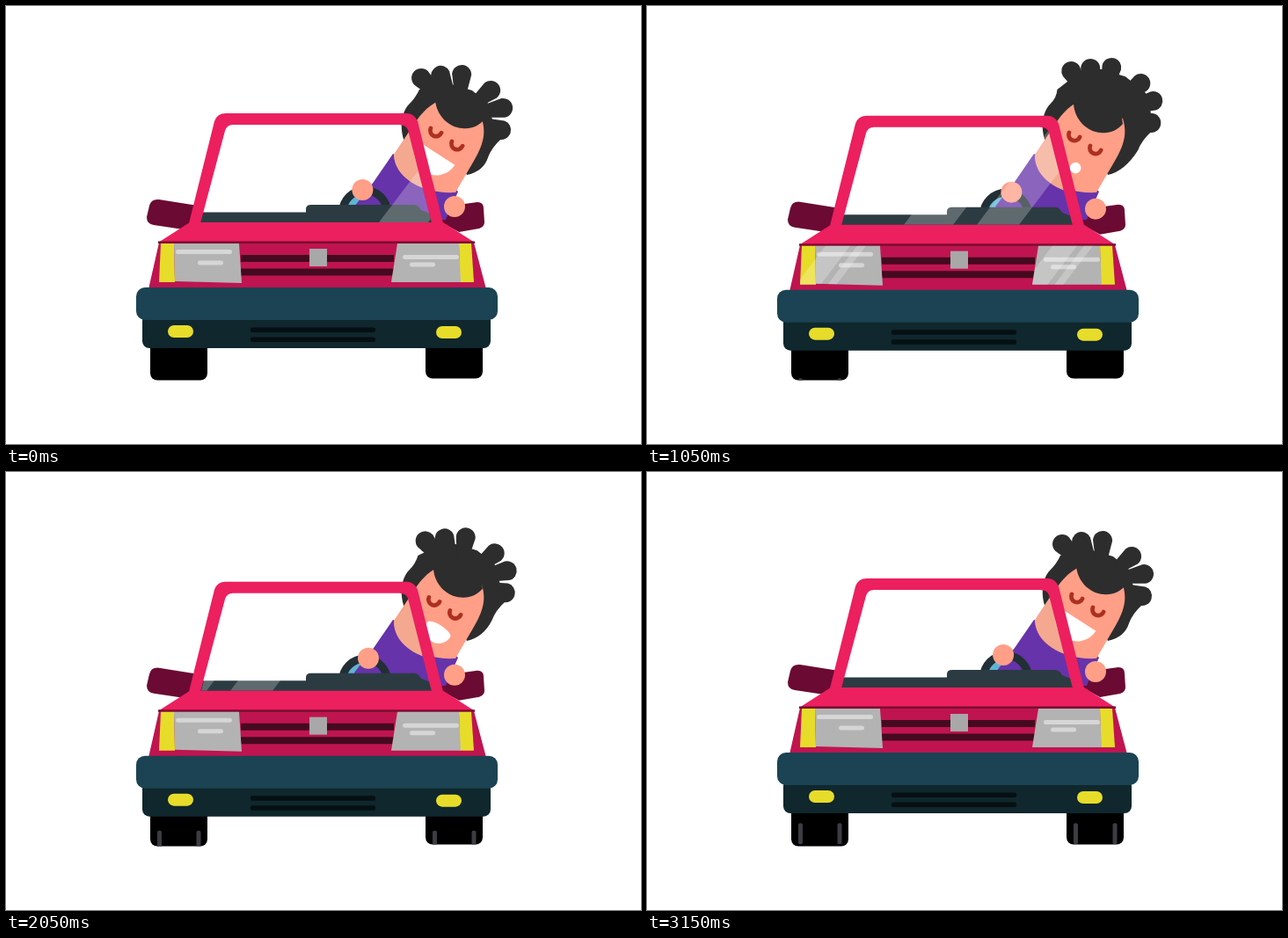
Recreate the animation shown at these times as an HTML page with a canvas. Size 722 px wide and 498 px high, loop 3250 ms.

```html
<!DOCTYPE html>
<html lang="en">
<head>
<meta charset="utf-8">
<title>Car ride</title>
<style>
  html, body { margin: 0; width: 722px; height: 498px; overflow: hidden; background: #fff; }
  canvas { display: block; }
</style>
</head>
<body>
<canvas id="stage" width="722" height="498"></canvas>
<script>
const ctx = document.getElementById('stage').getContext('2d');
const LOOP = 3250, STEP = 100, COUNT = 33;
const PINK = '#ec1f5f', SKIN = '#ff9f87', HAIR = '#2d2d2d', YELLOW = '#e8dc2a';
const WINE = '#6b0a33', LAMP = '#b3b3b3', GRILLE = '#450a1f', VENT = '#060f12';

const GLASS = 'M222 246 L249 142 Q251 135 258 135 H447 Q455 135 457 141 L484 246Z';
const HEAD = 'M441 169 C442 195 473 214 511 212 L532 176 C545 154 545 142 541 128 L505 104 C488 107 476 117 467 130Z';

// Car height offsets as [step, pixels].
const BOUNCE = [[0, 0], [4, 3], [8, 5], [15, -1], [19, 3], [24, 2], [32, -1]];

const mix = (a, b, f) => a + (b - a) * f;
const ramp = (k, a, b) => Math.min(1, Math.max(0, (k - a) / (b - a)));
const swell = (k, peak) => (1 + Math.cos((k - peak) / COUNT * Math.PI * 2)) / 2;

function bounceAt(k) {
  let i = 0;
  while (i < BOUNCE.length - 2 && k > BOUNCE[i + 1][0]) i++;
  const [[k0, y0], [k1, y1]] = BOUNCE.slice(i, i + 2);
  const f = ramp(k, k0, k1);
  return mix(y0, y1, f * f * (3 - 2 * f));
}

function shape(color, path) {
  ctx.fillStyle = color;
  ctx.fill(new Path2D(path));
}

function box(color, x, y, w, h, r = 0) {
  ctx.fillStyle = color;
  ctx.beginPath();
  ctx.roundRect(x, y, w, h, r);
  ctx.fill();
}

function disc(color, x, y, r) {
  ctx.fillStyle = color;
  ctx.beginPath();
  ctx.arc(x, y, r, 0, Math.PI * 2);
  ctx.fill();
}

function clipped(path, draw) {
  ctx.save();
  ctx.clip(new Path2D(path));
  draw();
  ctx.restore();
}

function shifted(x, y, draw) {
  ctx.save();
  ctx.translate(x, y);
  draw();
  ctx.restore();
}

// Slanted light band, x is its left edge at the bottom y.
function band(x, y, w, h) {
  const dx = h * 0.76;
  shape('rgba(255,255,255,0.24)', `M${x} ${y} h${w} l${dx} ${-h} h${-w}Z`);
}

// All tufts drift together; the gaps between them close as they swing out.
function hairBack(sway) {
  const cx = 515, cy = 125;
  const tips = [[472, 82], [494, 79], [518, 78], [551, 96], [565, 116], [563, 141]]
    .map(([x, y]) => [x + 11.5 * sway, y - 9 * sway]);
  const pull = 0.24 * (1 - sway);
  const crown = tips.slice(1).map(([x, y], i) => [
    mix((x + tips[i][0]) / 2, cx, pull),
    mix((y + tips[i][1]) / 2, cy, pull)
  ]);
  const [ex, ey] = tips[5];
  shape(HAIR, `M453 154 C447 138 450 120 458 112 Q466 104 ${470 - 4 * sway} 95`
    + crown.map(p => `L${p}`).join('')
    + `L${ex} ${ey + 10} Q${ex - 11} ${ey + 20} ${ex - 15} ${ey + 31} Q543 188 524 192 L500 150Z`);
  for (const [x, y] of tips) {
    const rx = mix(x, cx, 0.55), ry = mix(y, cy, 0.55);
    const a = Math.atan2(y - ry, x - rx);
    const sx = -Math.sin(a) * 6, sy = Math.cos(a) * 6;
    ctx.beginPath();
    ctx.arc(x, y, 11, a - Math.PI / 2, a + Math.PI / 2);
    ctx.lineTo(rx + sx, ry + sy);
    ctx.lineTo(rx - sx, ry - sy);
    ctx.fill();
  }
}

// A half-disc smile that closes to a small round whistle and opens again.
function mouth(k) {
  const round = Math.min(ramp(k, 4, 8), ramp(k, 24, 19));
  const drift = ramp(k, 8, 15);
  const r = 6.3 + 2.7 * ramp(k, 15, 19);
  const x = mix(489, 482 + 12 * drift, round);
  const y = mix(167, 181.5 + 6 * drift, round);
  const size = mix(25.5, r, round);
  shifted(x, y, () => {
    ctx.rotate(0.575);
    ctx.fillStyle = '#fff';
    ctx.beginPath();
    ctx.ellipse(0, 0, size, size, 0, 0, Math.PI);
    ctx.ellipse(0, 0, size, r * round, 0, Math.PI, Math.PI * 2);
    ctx.fill();
  });
}

function driver(k) {
  const sway = swell(k, 13.7) ** 1.7;
  const nod = Math.min(1, sway * 1.7);
  hairBack(sway);
  shape('#6633aa', 'M440 168 L418 200 L396 228 L405 243 H500 L514 211 L490 190Z');
  shape(SKIN, HEAD);
  shifted(-3 * nod, 5 * nod, () => {
    shape(HAIR, 'M488 106 C489 124 503 138 519 139 C529 140 537 137 544 129 L541 108 L500 95Z');
    ctx.strokeStyle = '#ad3020';
    ctx.lineWidth = 4.8;
    ctx.lineCap = 'round';
    for (const [x, y] of [[489, 141.5], [513, 156.5]]) {
      ctx.beginPath();
      ctx.arc(x, y, 6.6, 0.4, Math.PI + 0.4);
      ctx.stroke();
    }
  });
  mouth(k);
}

function wheels(k) {
  const low = 372 + 6.85 * k % 84;
  for (const [x, bottom] of [[164, 425.5], [477, 423.5]]) {
    box('#000', x, 375, 65, bottom - 375, 8);
    clipped(`M${x} 375 h65 V${bottom} h-65Z`, () => {
      for (const dx of [8, 52.5]) box('#3c3c42', x + dx, low - 24, 5, 24, 2);
    });
  }
}

function interior(k) {
  const glint = 424 - 12 * k;
  clipped(GLASS, () => shape('#f4a890', HEAD));
  ctx.lineWidth = 9;
  ctx.strokeStyle = '#222f35';
  ctx.beginPath();
  ctx.arc(408, 235, 25.5, Math.PI, Math.PI * 2);
  ctx.stroke();
  shape('#2c3b42', 'M220 234.5 H341 V231 Q341 226 347 226 H464 Q469 226 472 232 L482 236 L486 248 H220Z');
  disc(SKIN, 405 + 10.5 * swell(k, 14.5), 209, 12);
  clipped(GLASS, () => {
    band(glint, 246, 56, 115);
    band(glint + 83, 246, 48, 115);
  });
}

function headlight(x, lamp, yellow, k) {
  shape(YELLOW, yellow);
  shape(LAMP, lamp);
  box('#d6d6d6', x + 2, x < 300 ? 277 : 283, 64, 5, 2.5);
  box('#d6d6d6', x + (x < 300 ? 27 : 10), x < 300 ? 289.5 : 291.5, 29, 5, 2.5);
  const glint = x + 54 - 11 * (k - 4);
  clipped(lamp + yellow, () => {
    band(glint, 316, 28, 48);
    band(glint + 36, 316, 10, 48);
  });
}

function carBody(k) {
  shape(PINK, 'M208 247 L237 131 Q240 122 250 122 H455 Q464 122 468 131 L497 247 H484 L457 141 Q455 135 447 135 H258 Q251 135 249 142 L221 247Z');
  shape(PINK, 'M209 246 H497 L533 269 H173Z');
  shape('#bf1450', 'M174 269 H532 L546 322 H162Z');
  box('#7a0d30', 173, 267.5, 360, 2.5);
  for (const y of [283, 298.5]) box(GRILLE, 267, y, 174, 8);
  headlight(191, 'M191 270 H265 L268 315 L192 313Z', 'M176 270 H191 L192 314 H174Z', k);
  headlight(449, 'M445 270 H515 L517 314 H438Z', 'M515 270 H529 L532 314 H516Z', k);
  box('#a8a8a8', 345, 276, 20, 20);
  box('#0f272d', 155, 350, 396, 39, 8);
  box('#1b4353', 148, 320, 411, 37, 10);
  for (const y of [365.5, 376.5]) box(VENT, 278, y, 142, 5.5, 2);
  box(YELLOW, 184, 363, 29, 14, 7);
  box(YELLOW, 489, 364, 29, 14, 7);
}

function mirrors() {
  shape(WINE, 'M174 220 L218 227 V254 L208 255 L168 249 Q160 248 160 240 L163 227 Q165 219 174 220Z');
  shape(WINE, 'M492 229 L536 223 Q543 223 543 230 L544 246 Q544 251 538 253 L515 257 L495 246Z');
}

function render(k) {
  const lift = bounceAt(k);
  box('#fff', 0, 0, 722, 498);
  wheels(k);
  shifted(0, lift, () => {
    mirrors();
    disc('#5fb4d6', 408, 232, 22);
  });
  driver(k);
  shifted(0, lift, () => {
    interior(k);
    carBody(k);
    disc(SKIN, 510, 228, 12);
  });
}

const start = performance.now();
function tick() {
  const t = (performance.now() - start) % LOOP;
  render(Math.floor((t + STEP / 2) / STEP));
  requestAnimationFrame(tick);
}
tick();
</script>
</body>
</html>
```
